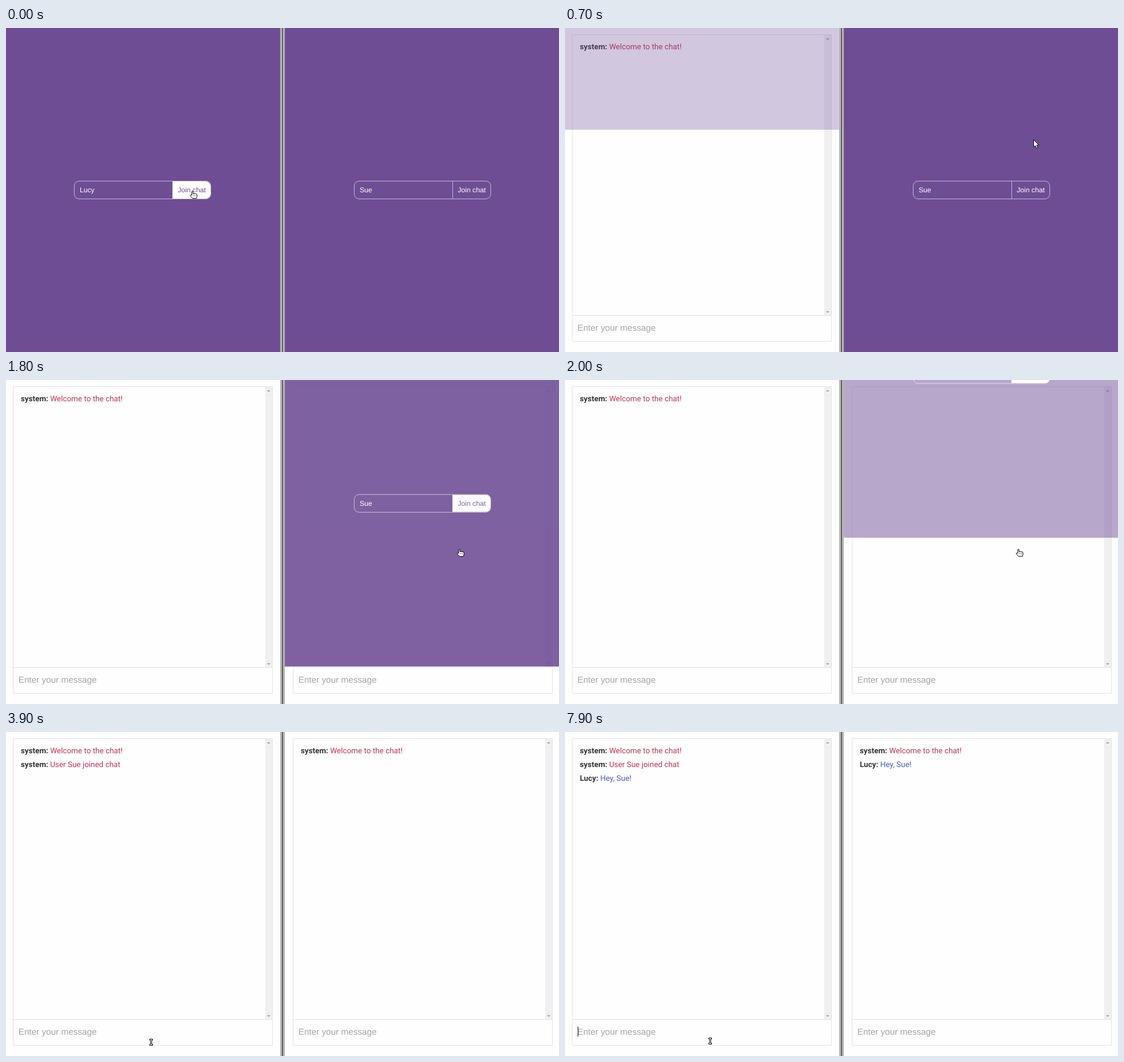
An HTML page that plays this animation: 960x564 px, repeating every 8 s.

```html
<!DOCTYPE html>
<html lang="en">
<head>
<meta charset="utf-8">
<title>Two-window chat</title>
<style>
  html, body { margin: 0; width: 100%; height: 100%; overflow: hidden; }
  body { position: relative; background: #fefefe; text-rendering: geometricPrecision; }
  div, svg { position: absolute; box-sizing: border-box; white-space: pre; }
  .pane { left: 0; top: 0; width: 476px; height: 564px; overflow: hidden; background: #fefefe; }
  .right { left: 484px; }
  .page { left: 0; top: 0; }
  .right .page { left: 2px; }

  .log { left: 12px; top: 11px; width: 451px; height: 490px; border: 1px solid #e4e4e4; }
  .bar { right: 0; top: 0; width: 12px; height: 488px; background: #f0f0f0; }
  .bar::before, .bar::after {
    content: ""; position: absolute; left: 3px; border: 3px solid transparent;
  }
  .bar::before { top: 2px; border-bottom-color: #a3a3a3; }
  .bar::after { bottom: 1px; border-top-color: #a3a3a3; }
  .messages { left: 25.7px; top: 21.6px; font: 13.4px/24.2px Roboto, sans-serif; color: #be3450; }
  .messages b { color: #333; }
  .messages .user { color: #4a58c6; }
  .entry {
    left: 12px; top: 500px; width: 451px; height: 46px; padding-left: 8.5px;
    border: 1px solid #e4e4e4; font: 15.2px/44px "Liberation Sans", Arial, sans-serif; color: #000;
  }
  .hint { color: #a5a5a5; }
  .caret {
    display: inline-block; width: 1px; height: 17px; margin-right: -1px;
    vertical-align: -3px; background: #000;
  }

  .cover { left: 0; top: 0; width: 476px; height: 566px; background: #6e4d95; }
  .form {
    left: 118px; top: 266px; width: 238px; height: 32px; overflow: hidden;
    border: 1px solid #c5b8d4; border-radius: 9px; color: #fff;
    font: 12.16px/30px "Liberation Sans", Arial, sans-serif;
  }
  .name { left: 9px; top: 0; }
  .join { right: 0; top: 0; width: 66px; height: 30px; border-left: 1px solid #c5b8d4; text-align: center; }
  .join.hover { background: #fff; color: #6e4d95; border-color: #fff; }

  .divider {
    left: 476px; top: 0; width: 8px; height: 564px;
    background: linear-gradient(90deg, #c8c8c6 1px, #8c8c8c 1px 2px, #e2e2e0 2px 3px,
      #505050 3px 5px, #e2e2e0 5px 6px, #8c8c8c 6px 7px, #c8c8c6 7px);
  }
  #pointer { left: 0; top: 0; }
</style>
</head>
<body>
<div class="divider"></div>
<svg id="pointer" width="960" height="564"><path fill="#fff" stroke="#000" stroke-linejoin="round"/></svg>
<script>
const LOOP = 8000, STEP = 100, COVER_HEIGHT = 566, SLIDE_MS = 505;
const FOCUS_AT = 4000, BLINK_MS = 600, SEND_AT = 7900;

// The message is typed in short bursts with an even rhythm.
const BURSTS = [
  { text: "Hey", start: 5000, gap: 150 },
  { text: ", ", start: 5700, gap: 100 },
  { text: "Sue!", start: 6500, gap: 370 }
];
const DRAFT = BURSTS.map(burst => burst.text).join("");

const SHAPES = {
  arrow: "M.5 .5V13.5L3.4 10.8L5.5 15.3L7.8 14.3L5.7 9.9H9.6Z",
  hand: "M3.5 7.5V1.8Q3.5 .5 4.6 .5Q5.7 .5 5.7 1.8V5H10.5Q12.5 5 12.5 7V10L11.5 13H4.8L1 8.8Q.3 7.3 1.6 7ZM6 8V9M8 8V9M10 8V9",
  beam: "M-2.5 -5.5H2.5V-3.5H1V3.5H2.5V5.5H-2.5V3.5H-1V-3.5H-2.5Z"
};

// Places where the pointer turns or rests.
const STOPS = [
  { x: 319, y: 283.5, arrive: 0, leave: 300, shape: "hand" },
  { x: 813, y: 194, arrive: 700, leave: 700, shape: "arrow" },
  { x: 886, y: 230, arrive: 1000, leave: 1000, shape: "arrow" },
  { x: 782.5, y: 294, arrive: 1600, leave: 2100, shape: "hand" },
  { x: 345, y: 536, arrive: 2500, leave: 2600, shape: "beam" },
  { x: 252, y: 542, arrive: 3100, leave: 3800, shape: "beam" },
  { x: 252, y: 538, arrive: 4000, leave: LOOP, shape: "beam" }
];

const clamp = v => Math.min(1, Math.max(0, v));
const ease = k => k * k * (3 - 2 * k);
const mix = (a, b, k) => a + (b - a) * k;

function makePane(side, user, slideAt, log) {
  const pane = document.createElement("div");
  pane.className = "pane " + side;
  pane.innerHTML = `
    <div class="page">
      <div class="log"><div class="bar"></div></div>
      <div class="messages"></div>
      <div class="entry"><span class="typed"></span><i class="caret"></i><span class="hint">Enter your message</span></div>
    </div>
    <div class="cover"><div class="page"><div class="form">
      <div class="name">${user}</div><div class="join">Join chat</div>
    </div></div></div>`;
  document.body.prepend(pane);
  const find = name => pane.querySelector("." + name);
  return { slideAt, log, cover: find("cover"), join: find("join"), messages: find("messages"),
    typed: find("typed"), caret: find("caret"), hint: find("hint") };
}

const welcome = at => ({ at, from: "system", text: "Welcome to the chat!" });
const joined = { at: 2100, from: "system", text: "User Sue joined chat" };
const greeting = { at: SEND_AT, from: "Lucy", text: DRAFT };
const left = makePane("left", "Lucy", 353, [welcome(700), joined, greeting]);
const right = makePane("right", "Sue", 1740, [welcome(2100), greeting]);

function drawPane(pane, t, hover, typed, caretOn) {
  const p = clamp((t - pane.slideAt) / SLIDE_MS);
  pane.cover.style.transform = `translateY(${-COVER_HEIGHT * p}px)`;
  pane.cover.style.opacity = 1 - p;
  pane.join.classList.toggle("hover", hover);
  pane.messages.innerHTML = pane.log.filter(line => line.at <= t).map(({ from, text }) =>
    `<b>${from}:</b> <span class="${from === "system" ? "" : "user"}">${text}</span>`).join("\n");
  pane.typed.textContent = typed;
  pane.caret.style.visibility = caretOn ? "visible" : "hidden";
  pane.hint.hidden = typed !== "";
}

function entryAt(t) {
  if (t >= SEND_AT) return { typed: "", caretOn: true };
  let typed = "", touched = FOCUS_AT;
  for (const { text, start, gap } of BURSTS) {
    [...text].forEach((letter, i) => {
      const at = Math.floor((start + i * gap) / STEP) * STEP;
      if (at > t) return;
      typed += letter;
      touched = at;
    });
  }
  return { typed, caretOn: t >= touched && t < touched + BLINK_MS };
}

function pointerAt(t) {
  const i = STOPS.findLastIndex(stop => stop.arrive <= t);
  const from = STOPS[i], to = STOPS[i + 1] || from;
  const k = to === from ? 0 : ease(clamp((t - from.leave) / (to.arrive - from.leave)));
  const shape = k === 0 || from.shape === to.shape ? from.shape : "arrow";
  return { x: mix(from.x, to.x, k), y: mix(from.y, to.y, k), shape };
}

const pointer = document.querySelector("#pointer path");

function draw(t) {
  const { typed, caretOn } = entryAt(t);
  drawPane(left, t, t < 500, typed, caretOn);
  drawPane(right, t, t >= 1600, "", false);
  const { x, y, shape } = pointerAt(t);
  pointer.setAttribute("d", SHAPES[shape]);
  pointer.setAttribute("transform", `translate(${x} ${y})`);
}

const start = performance.now();
function tick() {
  const t = (performance.now() - start) % LOOP;
  draw(Math.floor(t / STEP) * STEP);
  requestAnimationFrame(tick);
}
tick();
</script>
</body>
</html>
```
